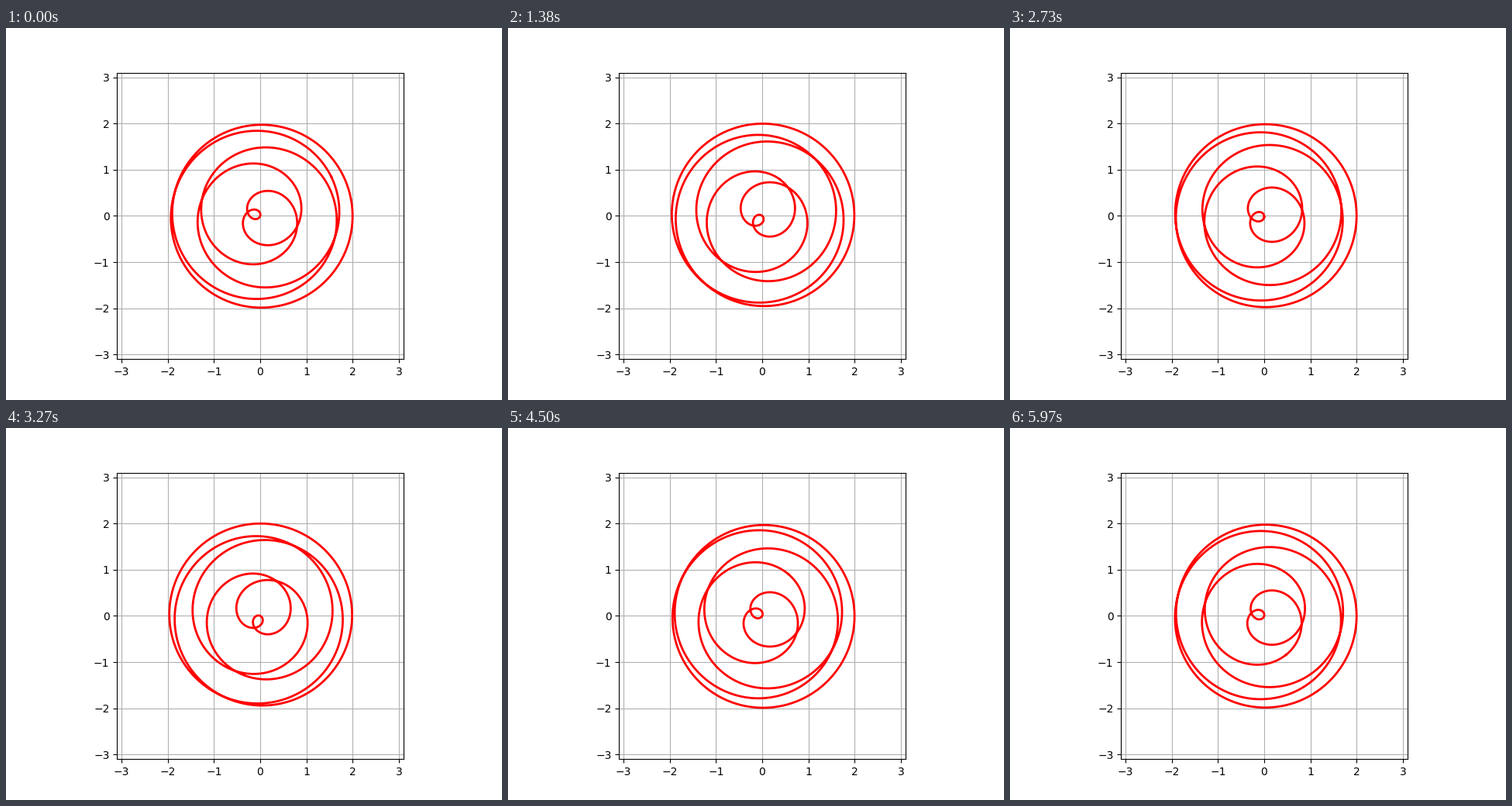
These frames come from a looping animation (640x480 px, 6000 ms). A matplotlib script:

```python
import numpy as np
import matplotlib.pyplot as plt
from matplotlib.animation import FuncAnimation

FRAMES = 200
INTERVAL = 30
LIMIT = 3.1

t = np.linspace(0, 2 * np.pi, 2000)


def rose(phase):
    """Sum of two unit circular motions; the phase turns the whole curve."""
    x = np.cos(6 * t) + np.cos(5 * t + phase)
    y = np.sin(6 * t) + np.sin(5 * t + phase)
    return x, y


fig, ax = plt.subplots(figsize=(6.4, 4.8), dpi=100)
ax.set_aspect("equal")
ax.set_xlim(-LIMIT, LIMIT)
ax.set_ylim(-LIMIT, LIMIT)
ax.set_xticks(range(-3, 4))
ax.set_yticks(range(-3, 4))
ax.grid(True)
line, = ax.plot([], [], color="red", lw=2)


def update(i):
    line.set_data(*rose(1 + 0.3 * i))
    return line,


ani = FuncAnimation(fig, update, frames=FRAMES, interval=INTERVAL,
                    repeat=True, repeat_delay=0)
plt.show()
```
